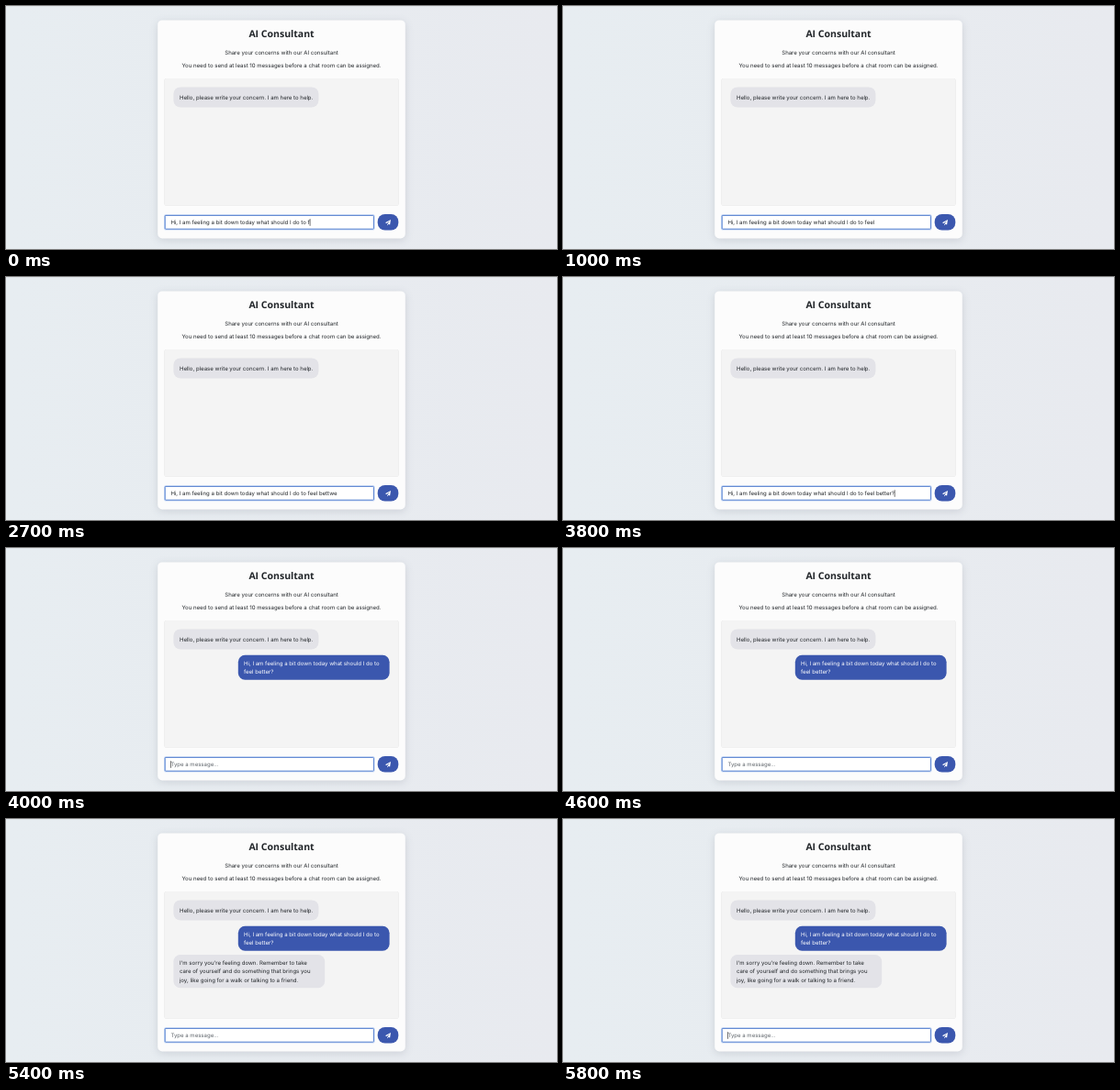
These frames come from a looping animation (600x265 px, 6000 ms). An HTML page:

```html
<!DOCTYPE html>
<html lang="en">
<head>
<meta charset="utf-8">
<title>AI Consultant</title>
<style>
  html, body { margin: 0; width: 100%; height: 100%; overflow: hidden; }
  body { background: linear-gradient(90deg, #e7edf1, #e8eaef); }
  svg { display: block; width: 600px; height: 265px; }
  text {
    font: 6.06px Inter, "Open Sans", sans-serif;
    fill: #212529;
    white-space: pre;
    text-rendering: geometricPrecision;
  }
  .title { font: 700 10.5px "Open Sans", "Noto Sans", sans-serif; }
  .centered { text-anchor: middle; }
  .card { fill: #fcfcfc; filter: drop-shadow(0 2px 4px rgba(40, 50, 70, .14)); }
  .chat { fill: #f4f4f4; filter: drop-shadow(0 .4px .4px rgba(0, 0, 0, .15)); }
  .bot { fill: #e3e3e8; }
  .brand { fill: #3b57ae; }
  .light, .sent text { fill: #fff; }
  .halo { fill: #c9daf6; }
  .field { fill: #fff; stroke: #5580cf; stroke-width: 1; }
  #placeholder { fill: #5f656b; }
</style>
</head>
<body>
<svg viewBox="0 0 600 265">
  <rect width="600" height="1" fill="#dfe4e8"/>
  <rect class="card" x="165.2" y="15.4" width="269.6" height="238" rx="5"/>
  <text class="title centered" x="300" y="33.9">AI Consultant</text>
  <text class="centered" x="300" y="53.2">Share your concerns with our AI consultant</text>
  <text class="centered" x="300" y="66.8">You need to send at least 10 messages before a chat room can be assigned.</text>

  <rect class="chat" x="172.5" y="79" width="255" height="138.8" rx="2"/>
  <rect class="bot" x="182.4" y="88.4" width="158" height="22" rx="7.5"/>
  <text x="188.9" y="101.8">Hello, please write your concern. I am here to help.</text>

  <g id="question" class="sent">
    <rect class="brand" x="252.8" y="116.8" width="164.8" height="27" rx="7.5"/>
    <text x="259" y="128">Hi, I am feeling a bit down today what should I do to</text>
    <text x="259" y="137.4">feel better?</text>
  </g>
  <g id="reply">
    <rect class="bot" x="182.4" y="148" width="164.8" height="36.2" rx="7.5"/>
    <text x="188.9" y="158.8">I'm sorry you're feeling down. Remember to take</text>
    <text x="188.9" y="168.3">care of yourself and do something that brings you</text>
    <text x="188.9" y="177.8">joy, like going for a walk or talking to a friend.</text>
  </g>

  <rect class="halo" x="172" y="227.2" width="229.6" height="17.2" rx="1.6"/>
  <rect class="field" x="173.2" y="228.4" width="227.2" height="14.8" rx=".8"/>
  <text id="placeholder" x="179.4" y="238.2">Type a message...</text>
  <text id="typed" x="179.4" y="238.2"></text>
  <rect id="caret" y="232.2" width=".6" height="7.6" fill="#111"/>

  <rect class="brand" x="404.7" y="227" width="22.6" height="17.6" rx="8"/>
  <path class="light" d="M419 232.9L412.9 236.3L414.7 237.1L418 234.2L415.5 237.4L418.1 238.5ZM415.2 237.8V239.3L416.3 238.3Z"/>
</svg>
<script>
  const LOOP = 6000, BLINK = 500, SEND = 4000, REPLY = 5400;
  const prefix = "Hi, I am feeling a bit down today what should I do to ";
  const keys = [
    [0, "f"], [100, "fe"], [300, "fee"], [400, "feel"], [500, "feel "],
    [1100, "feel b"], [1500, "feel be"], [1900, "feel bet"],
    [2000, "feel bett"], [2100, "feel bettw"], [2200, "feel bettwe"],
    [2900, "feel bettw"], [3000, "feel bett"], [3200, "feel bette"],
    [3300, "feel better"], [3800, "feel better?"]
  ];
  const byId = id => document.getElementById(id);
  const [question, reply, placeholder, typed, caret] =
    ["question", "reply", "placeholder", "typed", "caret"].map(byId);
  const show = (node, visible) => node.style.display = visible ? "" : "none";

  function render(time) {
    const sent = time >= SEND;
    const [keyTime, ending] = keys.filter(([start]) => start <= time).pop();
    const text = sent ? "" : prefix + ending;
    if (typed.textContent !== text) typed.textContent = text;
    show(question, sent);
    show(placeholder, sent);
    show(reply, time >= REPLY);
    // The blink restarts with every key press.
    show(caret, Math.floor((time - keyTime) / BLINK) % 2 === 0);
    caret.setAttribute("x", 179.3 + (sent ? 0 : typed.getComputedTextLength()));
  }

  function tick() {
    render(performance.now() % LOOP);
    requestAnimationFrame(tick);
  }
  tick();
</script>
</body>
</html>
```
